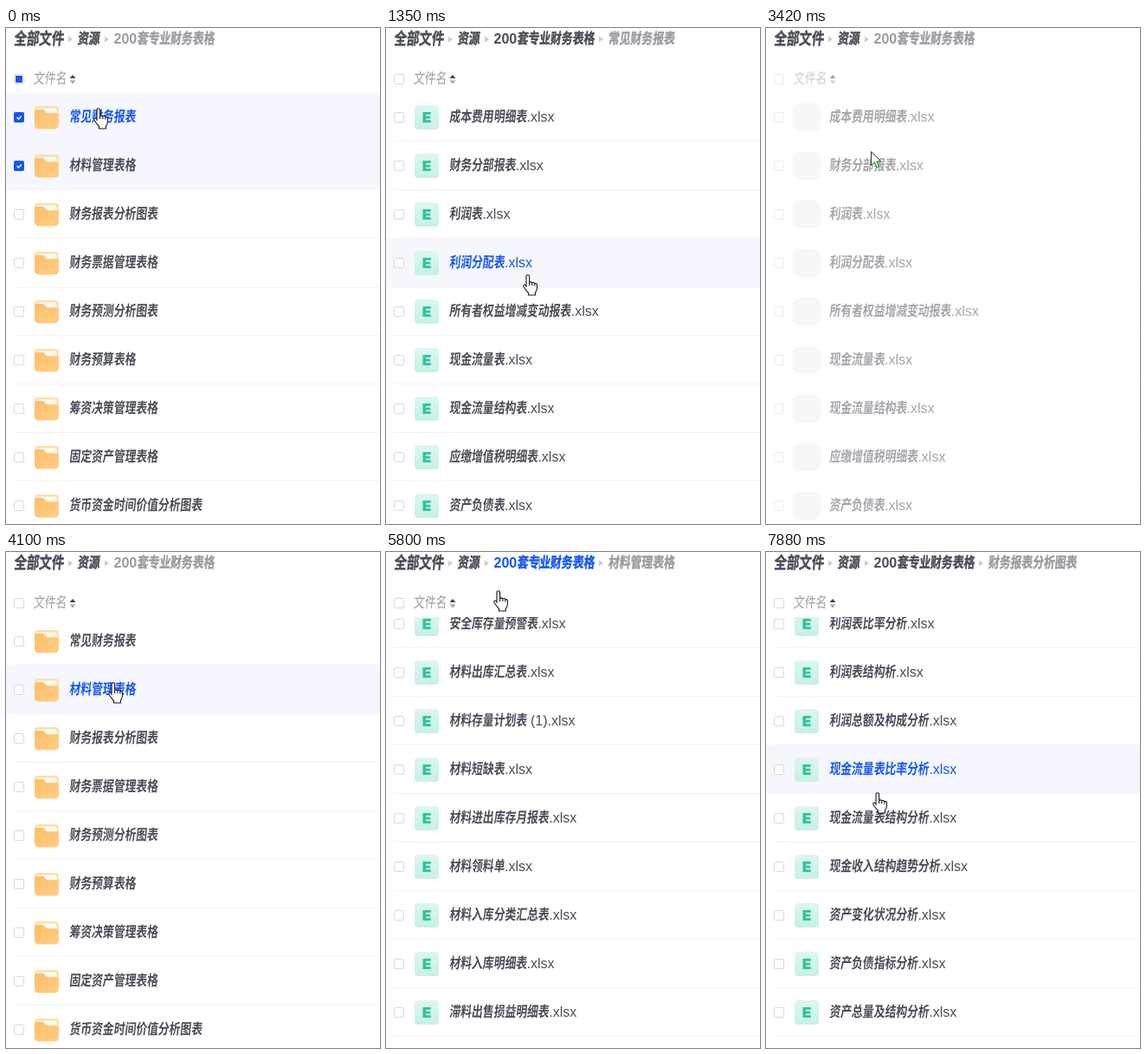
An HTML page that plays this animation: 432 px wide and 572 px high, repeating every 8 s.

```html
<!DOCTYPE html>
<html lang="zh-CN">
<head>
<meta charset="utf-8">
<title>文件列表</title>
<style>
  html, body { margin: 0; width: 100%; height: 100%; overflow: hidden; background: #fff; }
  svg { display: block; width: 432px; height: 572px; }
  text { font: 400 16px "Liberation Sans", Arial, sans-serif; white-space: pre; }
  .han { font-family: "Noto Sans CJK SC", "Noto Sans CJK", sans-serif; font-weight: 700; }
  .light { font-weight: 500; }
  .bold { font-weight: 700; }
</style>
</head>
<body>
<svg id="stage" viewBox="0 0 432 572" xmlns="http://www.w3.org/2000/svg">
  <defs>
    <linearGradient id="orange" x1="0" y1="0" x2="1" y2="1">
      <stop offset="0" stop-color="#ffbd68"/><stop offset="1" stop-color="#ffcf85"/>
    </linearGradient>
    <linearGradient id="mint" x1="0" y1="0" x2="0" y2="1">
      <stop offset="0" stop-color="#dcf7ee"/><stop offset="1" stop-color="#c6f0e3"/>
    </linearGradient>
    <clipPath id="view"><rect y="75" width="432" height="497"/></clipPath>
    <g id="folder">
      <rect y="1" width="28" height="24" rx="4" fill="#ffdfa9"/>
      <rect x="2.500" y="3.500" width="23" height="12" rx="2" fill="#fffaf2"/>
      <path d="M0 8a3 3 0 0 1 3-3H9q1.500 0 2.400 1.200L13 8.200Q13.800 9.200 15.300 9.200H25a3 3 0 0 1 3 3V23a4.500 4.500 0 0 1-4.500 4.500H4.500A4.500 4.500 0 0 1 0 23Z" fill="url(#orange)"/>
    </g>
    <g id="sheet">
      <rect width="28" height="28" rx="4" fill="url(#mint)"/>
      <path d="M9.500 8H18.800V10.800H13V12.700H18.200V15.400H13V17.300H18.800V20.100H9.500Z" fill="#31c2a2"/>
    </g>
    <rect id="blank" x="-2" y="-2" width="32" height="32" rx="8" fill="#eee"/>
    <path id="hand" d="M4 15V2.500a1.800 1.800 0 0 1 3.600 0V9.500q1.600-1.400 3.200.4q1.800-1 3 .7q2.400-.6 2.600 1.800V16q0 3-2 5V24H6.500V21.500Q4 19 1 14.500Q.2 12.600 1.600 12Q3 11.800 4 13.500M7.600 9.500V13M10.800 10V13M13.800 10.600V13.500" fill="#fff" stroke="#15171d" stroke-width="1.100" stroke-linejoin="round"/>
    <g id="arrow" stroke-linejoin="round">
      <path d="M.5.5V16.500L4.300 13L7 18.800L9.500 17.600L7 12H12Z" fill="#fff" stroke="#333" stroke-width="1"/>
      <path d="M2 15L4.500 12.500L7.200 18.500M7.500 12.500L9.500 17M8 11.500H13" fill="none" stroke="#25c832" stroke-width="1.200"/>
    </g>
  </defs>
  <g id="scene"></g>
</svg>
<script>
const LOOP = 8000, ROW = 56, TOP = 75;
const INK = '#4a4d58', GREY = '#9b9ca2', BLUE = '#1456f5';

const words = s => s.split(' ');
const sheets = s => words(s).map(n => n.replace('_', ' ') + '.xlsx');
const lists = {
  root: words('常见财务报表 材料管理表格 财务报表分析图表 财务票据管理表格 财务预测分析图表 财务预算表格 筹资决策管理表格 固定资产管理表格 货币资金时间价值分析图表'),
  common: sheets('成本费用明细表 财务分部报表 利润表 利润分配表 所有者权益增减变动报表 现金流量表 现金流量结构表 应缴增值税明细表 资产负债表'),
  stock: sheets('三个月无移动滞料明细表 安全库存量预警表 材料出库汇总表 材料存量计划表_(1) 材料短缺表 材料进出库存月报表 材料领料单 材料入库分类汇总表 材料入库明细表 滞料出售损益明细表'),
  charts: sheets('成本费用结构及变动分析 利润表比率分析 利润表结构析 利润总额及构成分析 现金流量表比率分析 现金流量表结构分析 现金收入结构趋势分析 资产变化状况分析 资产负债指标分析 资产总量及结构分析')
};

// Each step lists only what differs from the step before it.
const steps = [
  [0, { list: 'root', icon: 'folder', leaf: '', dim: 1, scroll: 0, hover: 0, at: [101, 92], checked: 2, link: false, caret: false, cursor: 'hand' }],
  [340, { leaf: '常见财务报表', dim: .33, hover: -1, checked: 0 }],
  [690, { list: 'common', icon: 'blank', dim: 1 }],
  [1020, { icon: 'sheet', hover: 0, at: [128, 98] }],
  [1350, { hover: 3, at: [158, 284] }],
  [1700, { hover: 4, scroll: 20 }],
  [2040, { hover: 3, at: [191, 184] }],
  [2390, { scroll: 0 }],
  [2720, { hover: 1, at: [150, 44] }],
  [3070, { hover: -1, link: true, at: [150, 10] }],
  [3420, { leaf: '', link: false, icon: 'blank', dim: .5, cursor: 'arrow', at: [121, 142] }],
  [3770, { list: 'root', icon: 'folder', cursor: 'hand', at: [118, 150] }],
  [4100, { dim: 1, hover: 1 }],
  [4440, { leaf: '材料管理表格', dim: .33, hover: -1, at: [130, 160] }],
  [4790, { list: 'stock', icon: 'blank', dim: 1, hover: 2, at: [179, 203] }],
  [5120, { icon: 'sheet', scroll: 76, hover: 3 }],
  [5470, { hover: 4, at: [150, 131] }],
  [5800, { hover: -1, link: true, caret: true, at: [124, 44] }],
  [6140, { leaf: '', link: false, caret: false, icon: 'blank', dim: .5, scroll: 0, cursor: 'arrow', at: [124, 130] }],
  [6500, { list: 'root', icon: 'folder', dim: 1, hover: 2, cursor: 'hand', at: [140, 210] }],
  [6840, { leaf: '财务报表分析图表', dim: .33, hover: -1, at: [147, 254] }],
  [7190, { list: 'charts', icon: 'blank', dim: 1, hover: 3 }],
  [7530, { icon: 'sheet', scroll: 47, hover: 4, at: [135, 266] }],
  [7880, { scroll: 76, at: [123, 277] }]
];
let last = {};
const states = steps.map(([t, change]) => (last = { ...last, ...change, t }));

const pen = document.createElement('canvas').getContext('2d');
function latinWidth(s, bold) {
  pen.font = `${bold ? 700 : 400} 16px "Liberation Sans", Arial, sans-serif`;
  return pen.measureText(s).width;
}

// Chinese runs are condensed and slanted; Latin runs stay upright.
function label(str, x, y, fill, weight = '', size = 16) {
  let out = '';
  const edge = weight === 'bold' ? .45 : 0;
  for (const run of str.match(/[\u4e00-\u9fff]+|[^\u4e00-\u9fff]+/g)) {
    if (run.charCodeAt(0) > 255) {
      out += `<text class="han ${weight}" style="font-size:${size}px" fill="${fill}" stroke="${fill}" stroke-width="${edge}" transform="translate(${x} ${y}) skewX(-6) scale(.8 1.06)">${run}</text>`;
      x += run.length * size * .8;
    } else {
      out += `<text class="${weight}" x="${x}" y="${y}" fill="${fill}">${run}</text>`;
      x += latinWidth(run, weight === 'bold');
    }
  }
  return out;
}

function box(y, on) {
  return on
    ? `<rect x="9" y="${y}" width="12" height="12" rx="2" fill="${BLUE}"/><path d="M12.500 ${y + 6}l2 2l3.200-3.500" fill="none" stroke="#fff" stroke-width="1.400"/>`
    : `<rect x="9.500" y="${y + .5}" width="11" height="11" rx="1.500" fill="#fff" stroke="#d9dade"/>`;
}

function crumbs(s) {
  const sep = x => `<path d="M${x} 9.500l5 3.500l-5 3.500Z" fill="#cbccd0"/>`;
  const tint = s.link ? BLUE : s.leaf ? INK : GREY;
  return label('全部文件', 9, 18.5, INK, 'bold', 18) + sep(72)
    + label('资源', 82.5, 18, INK, 'bold') + sep(114)
    + label('200套专业财务表格', 124.5, 18, tint, 'bold')
    + (s.leaf ? sep(246) + label(s.leaf, 256.5, 18, GREY, 'bold') : '')
    + (s.caret ? '<path d="M177 5V21" stroke="#5f6f9c"/>' : '');
}

function head(s) {
  return box(53, false)
    + (s.checked ? `<rect x="11" y="55" width="8" height="8" fill="${BLUE}"/>` : '')
    + label('文件名', 31.5, 64, GREY, 'light')
    + '<path d="M73.500 58l3.500-4l3.500 4Z" fill="#3f434e"/><path d="M73.500 60.500l3.500 4l3.500-4Z" fill="#a3a5ab"/>';
}

function row(name, i, s) {
  const y = TOP + i * ROW - s.scroll;
  const on = i < s.checked, hot = i === s.hover;
  return (on || hot ? `<rect y="${y}" width="432" height="${ROW}" fill="#f6f7fe"/>` : '')
    + `<rect x="9" y="${y + ROW - 1}" width="423" height="1" fill="#f4f4f6"/>`
    + box(y + 22, on)
    + `<use href="#${s.icon}" x="33" y="${y + 14}"/>`
    + label(name, 73, y + 33, hot ? BLUE : INK);
}

const scene = document.getElementById('scene');
function draw(s) {
  scene.innerHTML = crumbs(s)
    + `<g opacity="${s.dim}">${head(s)}<g clip-path="url(#view)">${lists[s.list].map((n, i) => row(n, i, s)).join('')}</g></g>`
    + `<use href="#${s.cursor}" x="${s.at[0]}" y="${s.at[1]}"/>`;
}

const start = performance.now();
let shown;
function tick() {
  const t = (performance.now() - start) % LOOP;
  const s = states.findLast(k => k.t <= t) || states[0];
  if (s !== shown) draw(shown = s);
  requestAnimationFrame(tick);
}
tick();
</script>
</body>
</html>
```
